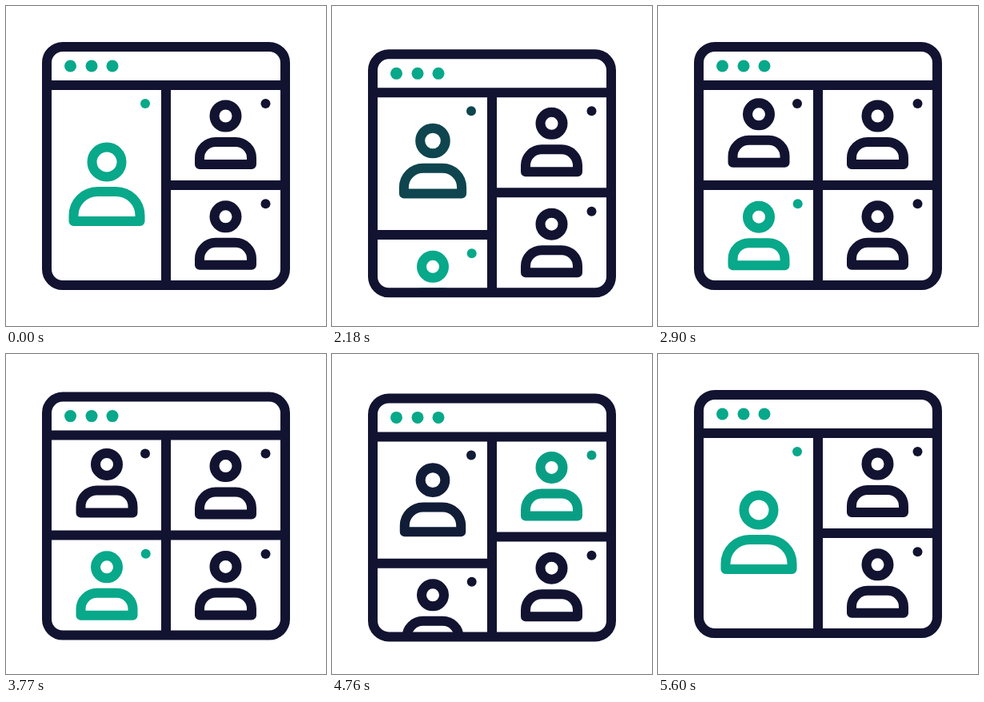
An HTML page that plays this animation: 400x400 px, repeating every 5630 ms.

```html
<!DOCTYPE html>
<html lang="en">
<head>
<meta charset="utf-8">
<title>Video call layouts</title>
<style>
  html, body { margin: 0; width: 100%; height: 100%; overflow: hidden; background: #fff; }
  svg { display: block; width: 100%; height: 100%; }
</style>
</head>
<body>
<svg viewBox="0 0 400 400">
  <defs>
    <clipPath id="inside"><rect x="51" y="51" width="298" height="298" rx="20"/></clipPath>
  </defs>
  <g id="win" fill="none" stroke="#121331" stroke-width="12" stroke-linejoin="round">
    <g clip-path="url(#inside)">
      <g id="drawer"><path d="M51 224H200"/></g>
    </g>
    <g id="cells"></g>
    <path d="M51 99H349M200 99V349M200 224H349"/>
    <rect x="51" y="51" width="298" height="298" rx="20"/>
    <g fill="#08a88a" stroke="none">
      <circle cx="80.5" cy="75" r="7.5"/>
      <circle cx="107" cy="75" r="7.5"/>
      <circle cx="133" cy="75" r="7.5"/>
    </g>
  </g>
</svg>
<script>
const LOOP = 5630, SPLIT = 2015, SWAP = 3605, MERGE = 4690;
const DARK = [18, 19, 49], GREEN = [8, 168, 138];
const $ = id => document.getElementById(id);
const clamp = v => Math.min(1, Math.max(0, v));
const mix = (a, b, k) => a + (b - a) * k;
const easeOut = v => 1 - Math.pow(1 - clamp(v), 3);
const tint = k => `rgb(${DARK.map((d, i) => Math.round(mix(d, GREEN[i], k)))})`;

function add(parent, tag, attrs) {
  const el = document.createElementNS('http://www.w3.org/2000/svg', tag);
  for (const name in attrs) el.setAttribute(name, attrs[name]);
  return parent.appendChild(el);
}

// One participant: head, shoulders and status dot.
function person(parent, x, y, dotX, dotY) {
  const head = add(parent, 'circle', { cx: x });
  const body = add(parent, 'path', {});
  const dot = add(parent, 'circle', { cx: dotX, cy: dotY, r: 6, stroke: 'none' });
  return {
    dot,
    pose(size, cy = y) {
      const w = mix(32.5, 41.5, size), r = mix(20, 30, size);
      const top = cy + mix(32.5, 37, size), base = top + mix(28, 37, size);
      head.setAttribute('cy', cy);
      head.setAttribute('r', mix(14, 18.5, size));
      body.setAttribute('d', `M${x - w} ${base}V${top + r}a${r} ${r} 0 0 1 ${r} ${-r}` +
        `H${x + w - r}a${r} ${r} 0 0 1 ${r} ${r}V${base}Z`);
    },
    color(k) {
      const c = tint(k);
      head.setAttribute('stroke', c);
      body.setAttribute('stroke', c);
      dot.setAttribute('fill', c);
    }
  };
}

const topLeft = person($('cells'), 126, 135.3, 174, 122);
const topRight = person($('cells'), 274.5, 137.5, 324.5, 122);
const lowRight = person($('cells'), 274.5, 263.3, 324.5, 247.3);
const lowLeft = person($('drawer'), 126, 263.7, 174.7, 247.2);
[topRight, lowRight, lowLeft].forEach(p => p.pose(0));
lowRight.color(0);

// Quick drop of the window followed by a long settle.
function drop(t) {
  if (t <= 0 || t >= 885) return 0;
  return 12.7 * (t < 315 ? Math.sin(Math.PI / 2 * t / 315) : Math.pow((885 - t) / 570, 3.4));
}

const nudge = t => t <= 0 || t >= 555 ? 0 : 4 * Math.sin(Math.PI * t / 555) ** 2;
const fade = (t, start, from, to) => clamp((t - start - from) / (to - from));
const show = (el, on) => el.setAttribute('visibility', on ? 'visible' : 'hidden');

function draw(t) {
  const y = drop(t - SPLIT) + nudge(t - SWAP) + drop(t - MERGE);
  $('win').setAttribute('transform', `translate(0 ${y})`);

  const split = easeOut((t - SPLIT) / 630);
  const size = t < MERGE ? 1 - split : easeOut((t - MERGE) / 630);
  const slide = t < MERGE ? 1 - split : easeOut((t - MERGE) / 770);
  topLeft.pose(size, mix(135.3, 195, size));
  $('drawer').setAttribute('transform', `translate(0 ${132 * slide})`);

  const swap = fade(t, SWAP, 200, 340);
  const merge = fade(t, MERGE, 60, 220);
  topLeft.color(t < MERGE ? 1 - fade(t, SPLIT, 60, 220) : merge);
  lowLeft.color(1 - swap);
  topRight.color(swap * (1 - merge));

  show(lowLeft.dot, t < 3140 || t >= 3320);
  show(topRight.dot, t < 4310 || t >= 4520);
}

function tick() {
  draw(performance.now() % LOOP);
  requestAnimationFrame(tick);
}
tick();
</script>
</body>
</html>
```
